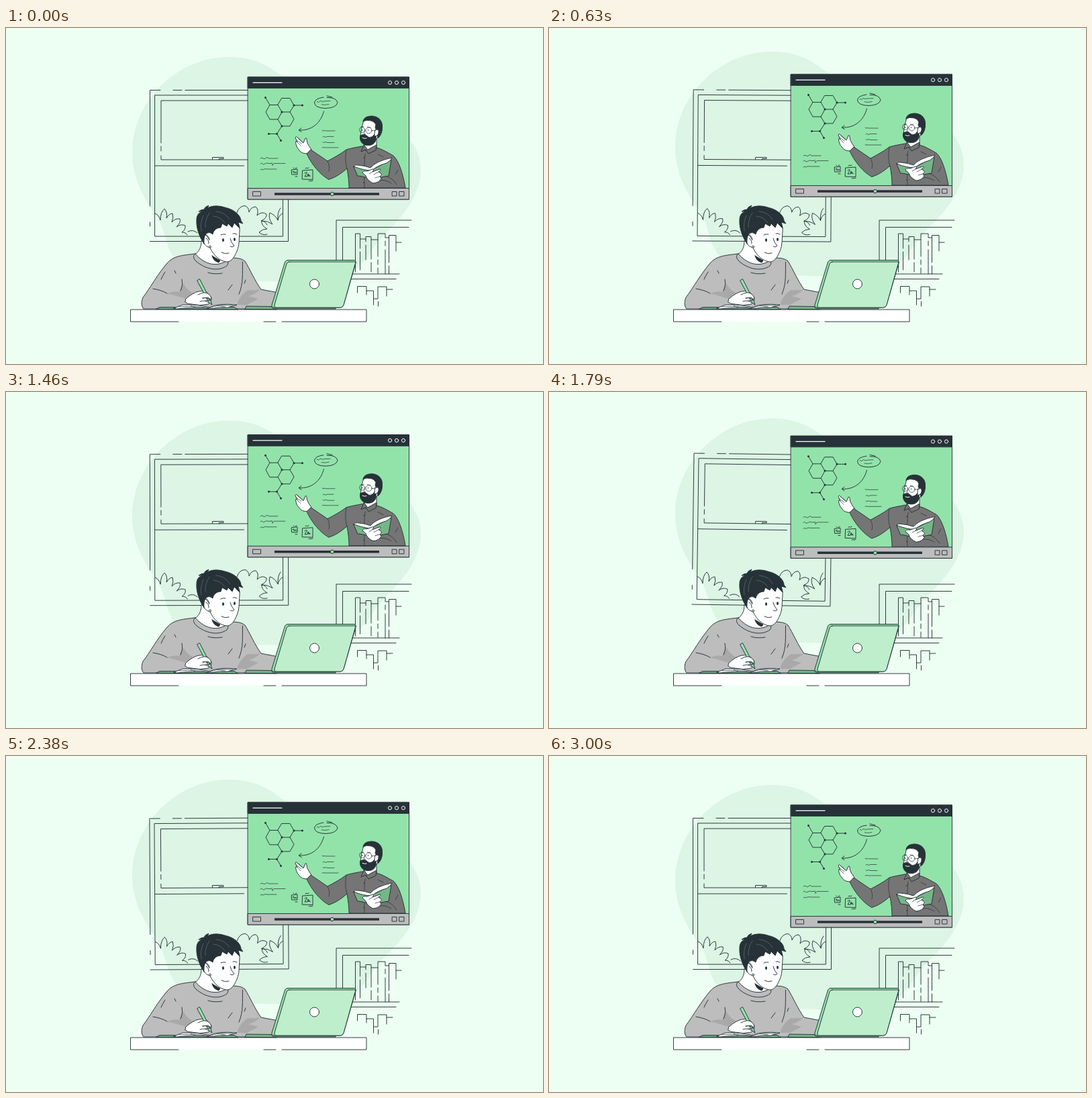
Recreate the animation shown at these times as an HTML page. Size 800 by 500 pixels, loop 3040 ms.

```html
<!DOCTYPE html>
<html lang="en">
<head>
<meta charset="utf-8">
<title>Online lesson</title>
<style>
html, body { margin: 0; height: 100%; overflow: hidden; background: #edfff2; }
svg { display: block; width: 800px; height: 500px; }
g { stroke: #263238; stroke-width: .95; stroke-linecap: round; stroke-linejoin: round; fill: none; }
.white { fill: #fff; }
.dark { fill: #263238; }
.green { fill: #92e3a9; }
.pale { fill: #beeecb; }
.moss { fill: #75b687; }
.grey { fill: #bdbdbd; }
.shade { fill: #a9a9a9; stroke: none; }
.shirt { fill: #757575; }
.light { stroke: #fff; }
.thin { stroke-width: .7; }
</style>
</head>
<body>
<svg viewBox="0 0 800 500">
  <path id="blob" fill="#dcf5e4" d="M332 43C372 43 397 59 418 78C450 108 490 128 535 130C580 133 618 170 618 211C618 249 591 280 567 304C544 327 537 347 519 361C488 384 285 384 256 350C236 327 240 302 222 277C203 250 188 222 188 185C188 109 255 43 332 43Z"/>

  <g id="pane">
    <path d="M214.500 265V92.500H230M249 92.500H262M267 92.500H420.500V317.500H214.500M214.500 289V295"/>
    <path d="M222 100H412.500V310H222ZM222 205H354.500"/>
    <path d="M231 171V108H404V196H231V190M231 176V183"/>
    <path d="M307.500 195.500V192.500H324V194.500H317.500V196"/>
    <path d="M222 276Q228 278 230 286Q230 274 236 269Q241 274 239 283Q243 276 248 276Q250 282 247 289Q252 283 259 284Q261 289 254 296Q261 291 267 294Q268 300 262 304Q268 304 270 308M271 303Q279 299 285 305"/>
    <path d="M344 275Q347 265 356 264.500Q362 267 362 274Q365 266 372 266Q377 270 374 279Q381 272 388 277Q389 283 380 287Q386 287 389 293"/>
    <path d="M412 276Q406 279 405 286Q404 274 409 268M405 286Q401 278 393 275Q390 283 397 292Q390 287 381 287Q380 294 389 299Q382 299 377 304Q382 309 389 307"/>
  </g>

  <g id="shelf">
    <path d="M604 286H492V346M600 296.500H501.500V346M514 366H586M514 373.500H581"/>
    <path d="M520.500 363V306H527.500V328M527.500 333V360M527.500 314H536M536 318V310.500H544V344M536 323V345M544 349V363M544 315H554V306H565V312H570M554 315V340M554 345V352M554 357V365M565 317V324M565 330V366M570.500 349V308.500H581V332M570.500 354V366M581 319H589"/>
    <path d="M523.500 394V384.500H537V397M537 391H547.500V412M547.500 403H554V385H567V399M567 389H576M554.500 407V414"/>
  </g>

  <g id="student">
    <path class="grey" d="M282 336C264 338 249 339 240 350C226 366 214 388 204 401C201 408 202 415 205 418H398L406 394L380 389C371 377 363 358 356 347C350 342 342 342 330 342Z"/>
    <path class="shade" d="M240 395Q252 391 258 393Q260 386 264 380Q270 391 280 395L268 403Q252 398 240 395ZM345 408Q350 397 360 390Q370 391 379 389Q372 396 362 399L376 403L359 412H345Z"/>
    <path d="M352.500 348C352 365 354 380 347 396M251 361L253 365M262 374Q264 383 260 391M357 375L355 380M337 382L331 390M322 365Q310 367 301 364M237 363Q233 369 231 374M219 388Q232 390 240 395"/>
    <path class="white" d="M291 317C291 328 287 332 282 337C292 351 310 357 329 349L326 344L308 326Z"/>
    <path class="grey" d="M282 336C278 338 279 343 283 347C297 359 316 363 329 354C332 350 331 346 328 344L326 348C310 356 294 350 282 336Z"/>
    <path class="dark" d="M307 339L319 346L317 349Q309 347 307 339Z"/>
    <path class="white" d="M297 306C303 294 315 287 331 284C343 284 349 291 348 302C347 313 348 323 344 332C340 342 335 348 329 348C318 347 309 338 304 327C296 325 291 318 295 310C298 306 302 309 303 315Z"/>
    <path class="dark" d="M295 321C288 311 283 297 284 285C284 278 288 274 293 273L287 273Q291 270 295 270Q296 266 302 264L300 268C307 264 317 264 326 267C340 270 350 279 350 287L353 291L346 289L348 298L340 290L337 297L331 291L329 295L322 291L320 297C314 297 309 301 308 307L305 305C298 303 294 309 295 321Z"/>
    <path stroke="#657078" class="thin" d="M294 279Q289 290 291 302M303 275Q296 286 297 297M313 273Q327 274 333 285M309 280Q320 281 326 290"/>
    <path d="M298 313Q302 314 302 321M320 308Q323 306 327 307M338 306Q341 305 344 307M334 313Q335 319 340 324Q338 327 334 325M321 334Q326 337 332 335"/>
    <ellipse class="dark" stroke="none" cx="323.500" cy="315.500" rx="1.500" ry="2.500"/>
    <ellipse class="dark" stroke="none" cx="340.500" cy="314.500" rx="1.500" ry="2.500"/>
    <circle class="white" cx="304" cy="325.500" r="1.500"/>
  </g>

  <g id="desk">
    <path class="white" stroke="none" d="M185.500 419H537V437H185.500Z"/>
    <path d="M257 437H185.500V419H537V437H411M384 437H402"/>
    <path class="moss" d="M224 418L229 415.500H340L345 418.500ZM356 418L358 414L398 414.500L403 418.500Z"/>
    <path class="white" d="M250 417L263 412Q287 411 303 416Q315 409 344 412L330 416Q315 415 304 418Q289 414 255 418Z"/>
    <path class="thin" d="M258 415Q285 413 303 417Q315 411 338 413M275 413L282 416M315 413L327 415"/>
    <path class="white" d="M268 403Q278 394 287 392Q297 390 303 397Q307 401 306 405Q306 409 301 411Q289 414 277 411Q270 411 267 408Z"/>
    <path class="green" d="M285 375.500L288.500 373.500L305 406L307 412L302 408Z"/>
    <path class="white" d="M286 397Q296 391 302 396Q307 400 305 404L301 401L293 402"/>
    <path d="M293 402Q299 400 304 405L297 406M289 407Q297 404 302 409"/>
  </g>

  <g id="laptop">
    <path class="moss" d="M396 415H491V418H399Z"/>
    <path class="green" d="M420 345.500H518Q522 345.500 521 350L503 412Q502 416 498 416H398Q395 416 396 412L415 350Q416 345.500 420 345.500Z"/>
    <path class="pale" d="M422 348H521L503 412Q502 416 498 416H402Q399 416 400 412L418 351Q419 348 422 348Z"/>
    <circle class="white" cx="459.500" cy="381" r="7"/>
  </g>

  <g id="video">
    <path class="green" d="M360.500 73H600.500V255H360.500Z"/>
    <path class="dark" d="M360.500 73H600.500V89.500H360.500Z"/>
    <path class="light" stroke-width="1.200" d="M368 81.300H411"/>
    <g class="light">
      <circle cx="572" cy="81.300" r="2.600"/><circle cx="582" cy="81.300" r="2.600"/><circle cx="592" cy="81.300" r="2.600"/>
    </g>

    <g id="board">
      <path d="M411 104.500H423L429 115L423 125H411L405 114.500ZM405 114.500H393L387 125L393 136H405L411 125M423 125L429 135.500L423 146H411L405 136M393 114.500L386.500 103.500M429 115H441.500M411 146L403.500 157.500H391.500M403.500 157.500L409.500 167.500"/>
      <path stroke-width="3" d="M386.500 103.500h0M429 115h0M441.500 115h0M411 125h0M411 146h0M403.500 157.500h0M391.500 157.500h0M409.500 167.500h0"/>
      <path d="M473 103Q460 105 459.500 111Q460 119 476 119.500Q492 119 494 111Q492 103 478 103.500M478 101L486 103"/>
      <path class="thin" d="M463 110q1-1.500 2 0t2-.5t3-.5t3 0l10-.5M470 114q1-1 2 0t9-.5"/>
      <path d="M473.500 124C469 141 456 153 437 152M440 149L436 152L440 154.500"/>
      <path class="thin" d="M471 152q1 2 2 1t3 0H490M472 162q2-1.500 3 0t3-.5H488M472 170q2 1 3 0t4 .5H489M471 178q2-1 4 0H495"/>
      <path class="thin" d="M379 194q2-2 4 0t4-.5t4 .5H405M379 202q2-2 3 0t4 0t4-.5l5 0l1-1l1 4l2-3H416M379 211q2-2 4 0l3-1.500l2 .5H403"/>
      <path d="M425.500 211L434 210V218L426 218ZM427 214l2-1l0 3l3-2v2M428 208l1 1M431 209l2-1M431 221l3 0M442 212L457 211V225.500L441.500 225ZM445 216q4-3 3 0l-3 5h4l1-4l1 4q1-5 2 0M446 209l2-1l1 1l2-1M451 228q2-2 3 0l3-1"/>
    </g>

    <g id="teacher">
      <path class="white" d="M449 187Q440 187 437 182Q433 178 432 173L431.500 169Q433 168 434 170L431 163Q432 160 434 163L443 171L446 164Q448 163 448 166Q448 171 451 175L455 181Z"/>
      <path class="thin" d="M434 170L439 175M432 166L440 172M434 163L442 170"/>
      <path class="shirt" d="M530 176C520 178 513 179 507 181C498 188 488 193 479 198L454 181L448 187C457 207 472 221 481 225.500C492 222 500 216 508 209C510 220 511 230 511 238H595C592 220 586 198 577 190C568 185 560 180 552 178Z"/>
      <path class="thin" d="M507 182Q504 194 508 210M479 198Q483 205 481 213M535 187Q533 204 534 238M565 220Q575 222 582 233M574 231Q564 225 558 227M584 211L580 218M554 188L562 192"/>
      <path class="white" d="M534 165V176L540 186L552 178V162Z"/>
      <path class="shirt" d="M533 174L529 184L536 181L540 187L551 182L552 174L539 181Z"/>
      <path class="white" d="M533 137Q529 150 528 162Q530 173 539 174Q552 171 556 157V143L545 134Z"/>
      <path class="dark" d="M532 139C533 133 538 131 546 131C556 132 561 139 560.500 147C561 154 558 161 554 164L553 160L555 155L554 151L552 153L550 148L551 144Q549 139 544 138Q537 136 532 139Z"/>
      <path class="dark" d="M528 160Q533 157 537 160L541 163Q546 163 549 158L551 160C553 169 547 177 535 174C529 172 526 165 528 160Z"/>
      <path class="white" d="M550 152Q556 149 555 156Q554 161 549 161Z"/>
      <path class="light" d="M531 163.500Q534 165 537 164"/>
      <path class="thin" d="M529 147L533 147M538 147L543 148M535 152L533 158L536 158M545 153L551 152"/>
      <circle class="thin" cx="530.500" cy="151.500" r="4"/><circle class="thin" cx="540.500" cy="152.500" r="4.500"/>
      <path stroke-width="1.600" d="M531 152h0M539.500 152h0M533 193h0M533 230h0M536 182h0"/>
      <path class="moss" d="M518 206L545 211Q559 204 574 196L570 220Q557 221 546 227Q537 221 524 220Z"/>
      <path class="white" d="M518 206Q520 203 524 204Q535 205 543 208Q551 198 575 193Q574 197 567 201Q553 205 545 212Q533 212 518 206Z"/>
      <path class="white" d="M531 215Q531 212 538 213L546 210Q549 210 546 214L557 210Q560 211 555 214L558 216Q561 218 557 221L559 224Q556 230 547 231Q538 227 536 220Z"/>
      <path class="thin" d="M546 214L541 217M555 214L548 218M557 221L550 223"/>
    </g>

    <path class="grey" d="M360.500 238.500H600.500V255H360.500Z"/>
    <path d="M368 243.500H379.500V250H368ZM575.500 243.500H582V250H575.500ZM586 243.500H593V250H586Z"/>
    <path stroke-width="3.500" stroke-linecap="butt" d="M400 247H556"/>
    <circle class="green" cx="486" cy="247" r="2.700"/>
  </g>
</svg>
<script>
const LOOP = 3040, CYCLE = 3000, FPS = 24, RISE = 9.5;
const [blob, pane, video] = ['blob', 'pane', 'video'].map(id => document.getElementById(id));

// Triangle wave: 0 at whole turns, 1 halfway between
const tri = p => 1 - Math.abs(1 - 2 * (p - Math.floor(p)));
const lift = (el, p) => el.setAttribute('transform', `translate(0 ${-RISE * tri(p)})`);

function draw(now) {
  const step = Math.floor((now % LOOP) * FPS / 1000 + 0.1);
  const slow = step / FPS * 1000 / CYCLE, fast = slow * 2;
  lift(video, slow);
  lift(blob, fast);
  // Sways one degree each way
  pane.setAttribute('transform', `rotate(${2 * tri(fast + 0.25) - 1} 317 205)`);
  requestAnimationFrame(draw);
}
draw(0);
</script>
</body>
</html>
```
